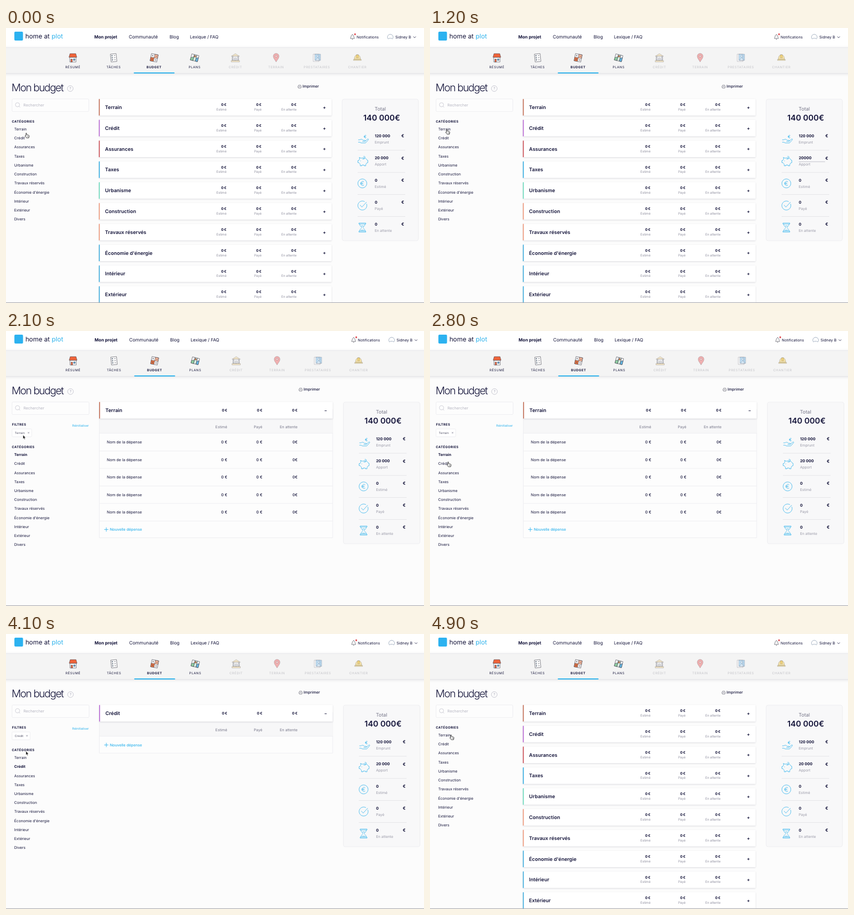
Animation, 800 px wide and 526 px high, one loop 5000 ms. Source, as an HTML page with a canvas:

```html
<!DOCTYPE html>
<html lang="fr">
<head>
<meta charset="utf-8">
<title>Mon budget</title>
<style>
html, body { margin: 0; width: 100%; height: 100%; overflow: hidden; background: #fcfcfc; }
canvas { display: block; width: 800px; height: 526px; }
</style>
</head>
<body>
<canvas id="stage"></canvas>
<script>
const stage = document.getElementById('stage');
const ctx = stage.getContext('2d');
const dpr = window.devicePixelRatio || 1;
stage.width = 800 * dpr;
stage.height = 526 * dpr;

const NAVY = '#14143a', GREY = '#9a9aa8', BLUE = '#2db2ec', LINE = '#eaeaee', INK = '#4a4a55';
const LOOP = 5000, DETAIL_FROM = 1300, DETAIL_TO = 4800, CREDIT_AT = 3100;
const ZERO = '0\u2009€';

const categories = [
  ['Terrain', '#c1674d'], ['Crédit', '#b562d2'], ['Assurances', '#c9454c'], ['Taxes', '#29a9e0'],
  ['Urbanisme', '#62d8b8'], ['Construction', '#ee9274'], ['Travaux réservés', '#ee9274'],
  ["Économie d'énergie", '#35a8dc'], ['Intérieur', '#35a8dc'], ['Extérieur', '#35a8dc'], ['Divers', '']
];
const columns = [['Estimé', 422], ['Payé', 489], ['En attente', 556]];

// Each tab: label, centre x, rotation, parts [path, fill]
const tabs = [
  ['RÉSUMÉ', 128, 0, [
    ['M-6-1V8H6V-1Z', '#fff'], ['M-5.5-8H5.5L7.5-1H-7.5Z', '#f0643a'],
    ['M-4 2.5H-1V8H-4Z', '#f0643a'], ['M1 2H4V5H1Z', '#5bb8ec']]],
  ['TÂCHES', 206, -.1, [
    ['M-5.5-7.5H5.5V7.5H-5.5Z', '#fff'], ['M-3.5-5H-2V-3.5H-3.5ZM-3.5-1H-2V.5H-3.5ZM-3.5 3H-2V4.5H-3.5Z', '#8ccbe8'],
    ['M.5-4H3.5M.5 0H3.5M.5 4H3.5']]],
  ['BUDGET', 283.5, .2, [
    ['M-6.5-7H6.5V7H-6.5Z', '#fff'], ['M-6.5 0H0V7H-6.5Z', '#f0743f'], ['M0-7H6.5V0H0Z', '#f7b596'],
    ['M-5-3.5H-2M-3.5-5V-2M2-3.5H5M-4.5 2L-2 5M-2 2L-4.5 5M2 2.7H5M2 4.4H5']]],
  ['PLANS', 361, .25, [
    ['M-7-6H-2V6H-7Z', '#fff'], ['M-2-6H3V6H-2Z', '#d9eee2'], ['M3-6H7V6H3Z', '#fff'],
    ['M-7 1L-2-1V6H-7Z', '#8fd0a2'], ['M3 0L7-2V6H3Z', '#64b9e6'],
    ['M0-4.5A1.6 1.6 0 1 1 0-1.3A1.6 1.6 0 1 1 0-4.5', '#f0843a']]],
  ['CRÉDIT', 439, 0, [
    ['M0-8L8-3H-8Z', '#f0cf86'], ['M-6-3H6V5H-6Z', '#fff'],
    ['M-6-2H-4V5H-6ZM4-2H6V5H4ZM-2 0H2V5H-2Z', '#b8bdc8'], ['M-8 5H8V8H-8Z', '#f0cf86']]],
  ['TERRAIN', 517, 0, [
    ['M0 8C-2 4-5.5 1-5.5-3A5.5 5.5 0 0 1 5.5-3C5.5 1 2 4 0 8Z', '#ee4a4a'], ['M0-5A2.1 2.1 0 1 1 0-.8A2.1 2.1 0 1 1 0-5', '#fff']]],
  ['PRESTATAIRES', 595, 0, [
    ['M-7-7H4V7H-7Z', '#fff'], ['M-4-7H7V5H-4Z', '#68b4ec'],
    ['M1.5-5A2 2 0 1 1 1.5-1A2 2 0 1 1 1.5-5', '#fff'], ['M-2 5C-2-1 5-1 5 5Z', '#fff']]],
  ['CHANTIER', 672.5, 0, [
    ['M-6 3C-6-9 6-9 6 3Z', '#f5c536'], ['M-1.8-6H1.8V0H-1.8Z', '#f5c536'], ['M-7.5 3H7.5V5H-7.5Z', '#f5c536']]]
];

// Summary rows: value, label, outline icon
const circle = 'M0-8.6A8.6 8.6 0 1 1 0 8.6A8.6 8.6 0 1 1 0-8.6';
const euro = 'M3-3.2C0-5.5-2.6-3-2.6 0C-2.6 3 0 5.5 3 3.2M-4-1H1.5M-4 1H1.5';
const summary = [
  ['120 000', 'Emprunt', 'M-9 1H-6C-3-1-1 0 1 2H4C5.5 2 5.5 4 4 4H-1M5 3L9-.5C11-1.5 11 .5 10 1.5L5 7H-3L-6 5.5H-9'],
  ['20 000', 'Apport', 'M-6-5L-7-7.5L-3-6C0-7.5 6-7 8-2.5L9.5-2V2.5L7.5 3L5.5 6V8.5H2.5V7H-2V8.5H-5V5.5C-7 4-7 3-7.5 2.5H-9.5V-1.5H-8ZM-4.5-1.5V-.5M-1-4.5H3M1-9A1.8 1.8 0 1 1 1-6.7'],
  ['0', 'Estimé', circle + euro],
  ['0', 'Payé', 'M8-3.2A8.6 8.6 0 1 1 4.5-7.3M-4.5-1L-.8 3L8-6.5'],
  ['0', 'En attente', 'M-6.5-8.7H6.5V-6.7H-6.5ZM-6.5 8.7H6.5V6.7H-6.5ZM-5-6.7C-5-2-1.3-2-1.3 0C-1.3 2-5 2-5 6.7M5-6.7C5-2 1.3-2 1.3 0C1.3 2 5 2 5 6.7M-2.5-3H2.5M-3 5H3']
];

// Pointer keys: time, x, y of the tip
const moves = [
  [0, 39, 201], [200, 37, 198], [700, 33, 194], [1300, 32.5, 194], [2000, 32.5, 196],
  [2700, 35, 250.5], [3100, 35, 250.5], [3500, 37.5, 235.5], [3900, 37.5, 235.5],
  [4500, 40, 191.5], [4800, 40, 191.5], [4900, 40.5, 193], [5000, 39, 201]
];

function text(s, x, y, size, weight = 400, color = NAVY, align = 'left', spacing = 0) {
  ctx.font = `${weight} ${size}px Inter, "Open Sans", sans-serif`;
  ctx.letterSpacing = spacing + 'px';
  ctx.textAlign = align;
  ctx.fillStyle = color;
  ctx.fillText(s, x, y + size * .36);
}

function box(x, y, w, h, fill, stroke, r = 0) {
  ctx.beginPath();
  ctx.roundRect(x, y, w, h, r);
  if (fill) { ctx.fillStyle = fill; ctx.fill(); }
  if (stroke) { ctx.strokeStyle = stroke; ctx.lineWidth = .8; ctx.stroke(); }
}

function shape(d, x, y, fill, stroke, width = .8, scale = 1, turn = 0) {
  ctx.save();
  ctx.translate(x, y);
  ctx.rotate(turn);
  ctx.scale(scale, scale);
  const path = new Path2D(d);
  if (fill) { ctx.fillStyle = fill; ctx.fill(path); }
  if (stroke) { ctx.strokeStyle = stroke; ctx.lineWidth = width; ctx.stroke(path); }
  ctx.restore();
}

function disc(x, y, r, fill, stroke) {
  box(x - r, y - r, 2 * r, 2 * r, fill, stroke, r);
}

function shadowed(blur, dy, draw) {
  ctx.save();
  ctx.shadowColor = 'rgba(40,40,60,.16)';
  ctx.shadowBlur = blur * dpr;
  ctx.shadowOffsetY = dy * dpr;
  draw();
  ctx.restore();
}

function header() {
  box(0, 0, 800, 37, '#fff');
  shadowed(6, 1, () => box(-10, 37.5, 820, 48.5, '#f4f4f4'));
  box(0, 37, 800, .8, '#e6e6e8');
  box(16, 7, 16.5, 17, '#2cb2f0', null, 2);
  text('home at ', 37, 15.5, 12.2);
  text('plot', 87.3, 15.5, 12.2, 400, BLUE);
  text('Mon projet', 169, 17, 8.3, 700);
  text('Communauté', 235, 17, 8.8);
  text('Blog', 313, 17, 8.5);
  text('Lexique / FAQ', 352, 17, 8.35);
  shape('M-4 3C-2.5 1.5-3-4 0-4C3-4 2.5 1.5 4 3ZM-1 4.5H1M0-5V-4', 663, 17, null, INK, .7);
  disc(668, 12, 1.7, '#e0484e');
  text('Notifications', 671, 17, 7.1);
  shape('M-4 3.6A5.4 5.4 0 1 1 4 3.6C3 1.5-3 1.5-4 3.6Z', 735.5, 17.5, '#fff', '#8d9db2');
  text('Sidney B', 745, 17, 7.3);
  shape('M-2.5-1.2L0 1.2L2.5-1.2', 782, 17.5, null, NAVY);

  tabs.forEach(([label, x, turn, parts], i) => {
    ctx.globalAlpha = i < 4 ? 1 : .4;
    for (const [d, fill] of parts) shape(d, x, 57, fill, INK, .65, 1, turn);
    ctx.globalAlpha = 1;
    const active = i === 2;
    text(label, x, 74.5, 6.1, active ? 700 : 400, i < 4 ? NAVY : '#c3c3c8', 'center', .6);
  });
  box(244.7, 85, 77.7, 2, BLUE);

  text('Mon budget', 10.6, 113.8, 20, 300, NAVY, 'left', -1.4);
  disc(123, 115.8, 5.5, null, '#b9b9c6');
  text('?', 123, 115.8, 7, 400, '#a0a0b2', 'center');
  shape('M-2-1.2V-3.2H2V-1.2M-2 1.7H-3.4V-1.2H3.4V1.7H2M-2 .8H2V3.2H-2Z', 562, 112.2, null, '#6a6a76', .55);
  text('Imprimer', 567.5, 111.8, 7.3, 500);
}

function totals(editing) {
  box(643.4, 136, 146, 271, '#f8f8f9', LINE, 4);
  text('Total', 716.3, 154.4, 9.4, 400, '#77778a', 'center');
  text('140 000€', 719, 171.9, 15.2, 600, NAVY, 'center');
  summary.forEach(([value, label, icon], i) => {
    const y = 206.6 + i * 42.2, edit = editing && i === 1;
    shape(icon, 683 - (i > 1), y + 6.3, null, BLUE, .8);
    if (!i) shape(euro, 687.5, y + 1.2, null, BLUE, 1.2, .65);
    text(edit ? '20000' : value, 705.7, y, 7.4, 700);
    text('€', 762, y, 8, 700, NAVY, 'right');
    text(label, 705.7, y + 12.2, 6.9, 400, GREY);
    if (edit) box(705.7, y + 6.7, 50.5, .7, '#b0b0ba');
    if (i < 4) box(673, y + 27, 91, .7, '#dedee2');
  });
}

function sidebar(detail, chosen, chip, hover) {
  box(11.5, 135.7, 147, 24, '#fdfdfd', LINE, 2);
  shape('M0-4A4 4 0 1 1 0 4A4 4 0 1 1 0-4M2.8 2.8L5 5', 22, 146.8, null, '#c4c4ce');
  text('Rechercher', 33.3, 147, 7.3, 400, '#b4b4c0');
  if (detail) {
    text('FILTRES', 11.5, 178.3, 6.2, 700, NAVY, 'left', .4);
    text('Réinitialiser', 158, 180.5, 5.9, 400, BLUE, 'right');
    if (chip) {
      const cross = chosen ? 40 : 43;
      box(11.5, 187.3, cross - 5.5, 15, '#fff', LINE, 1.5);
      text(categories[chosen][0], 16.8, 194.6, 5.7, 400, '#55556a');
      if (hover) disc(cross, 194.8, 3.9, '#6c6c78');
      shape('M-1.4-1.4L1.4 1.4M1.4-1.4L-1.4 1.4', cross, 194.6, null, hover ? '#fff' : '#77778a', .7);
    }
  }
  const top = detail ? 221.4 : 178.3;
  text('CATÉGORIES', 11.2, top, 6.2, 700, NAVY, 'left', .4);
  categories.forEach(([name], i) => {
    const bold = detail && i === chosen;
    text(name, 15.7, top + 15.1 + i * 17.23, 7.15, bold ? 700 : 400);
  });
}

function card(y, [name, color]) {
  shadowed(3, 1, () => box(178, y, 445, 31.6, '#fff', null, 1));
  box(177.8, y, 1.6, 31.6, color);
  text(name, 189.6, y + 15.8, 9.45, 600);
}

function list() {
  categories.slice(0, 10).forEach((category, i) => {
    const y = 135.8 + i * 39.8;
    card(y, category);
    for (const [label, x] of columns) {
      text(ZERO, x, y + 10.9, 6.8, 700, NAVY, 'right');
      text(label, x, y + 20, 6.1, 400, '#8c8c9c', 'right');
    }
    text('+', 609.5, y + 16, 8.5, 700, NAVY, 'center');
  });
}

function table(chosen) {
  const rows = chosen ? 0 : 5, end = 195.5 + rows * 33.5;
  box(178, 150, 445, end + 32.5 - 150, '#fdfdfd', LINE);
  box(178.4, 167, 444.2, 28.5, '#f7f7f8');
  box(178, 195.2, 445, .8, LINE);
  card(135.8, categories[chosen]);
  text('–', 609.5, 152, 8, 700, NAVY, 'center');
  for (const [label, x] of columns) {
    text(ZERO, x, 152, 6.8, 700, NAVY, 'right');
    text(label, x, 183, 7.15, 400, '#77778a', 'right');
  }
  for (let i = 0; i < rows; i++) {
    const y = 212.4 + i * 33.5;
    text('Nom de la dépense', 192.3, y, 7.3);
    columns.forEach(([, x], k) => text(k < 2 ? '0 €' : '0€', x, y, 7.4, 500, NAVY, 'right'));
    box(178, y + 16.6, 445, .8, LINE);
  }
  shape('M-4 0H4M0-4V4', 191.3, end + 16.7, null, BLUE, .9);
  text('Nouvelle dépense', 198, end + 16.6, 7.15, 500, BLUE);
}

function pointer(x, y, hand) {
  if (hand) {
    shape('M-1 .8C-1-.4 .7-.4 .7 .8V3.2L4.6 4.2C5.4 4.5 5.5 5 5.3 6L4.6 9.2H.2L-2.3 6C-3 5-2 4.4-1 5.4Z', x, y, '#fff', '#222', .85);
    shape('M1.4 5.5V7.5M2.8 5.6V7.6M4 5.8V7.6', x, y, null, '#333', .5);
  } else {
    shape('M0 0V7.2L1.6 5.8L2.7 8.3L3.9 7.8L2.8 5.3H5Z', x, y, '#111', '#fff', .5);
  }
}

function tip(t) {
  const i = moves.findIndex(m => m[0] > t);
  const [t0, x0, y0] = moves[i - 1], [t1, x1, y1] = moves[i];
  const p = (t - t0) / (t1 - t0), e = p * p * (3 - 2 * p);
  return [x0 + (x1 - x0) * e, y0 + (y1 - y0) * e];
}

function draw(t) {
  const detail = t >= DETAIL_FROM && t < DETAIL_TO;
  const chosen = t >= CREDIT_AT ? 1 : 0;
  const chip = t >= (chosen ? CREDIT_AT + 200 : DETAIL_FROM + 200);
  const [x, y] = tip(t);
  const onCross = detail && t > 4000 && x > 38 && y < 195;

  // Without its scrollbar the detail page is slightly wider
  ctx.setTransform(dpr * (detail ? 1.0035 : 1), 0, 0, dpr, 0, 0);
  ctx.textRendering = 'geometricPrecision';
  box(0, 0, 800, 526, '#fcfcfc');
  header();
  sidebar(detail, chosen, chip, onCross);
  if (detail) table(chosen); else list();
  totals(t >= 300 && t < DETAIL_FROM);
  box(0, 524.8, 800, 1.2, '#b0b0b4');
  ctx.setTransform(dpr, 0, 0, dpr, 0, 0);
  pointer(x, y, !detail || y > 230 || onCross);
}

function tick() {
  draw(Math.floor(performance.now() % LOOP / 100) * 100);
  requestAnimationFrame(tick);
}
tick();
</script>
</body>
</html>
```
